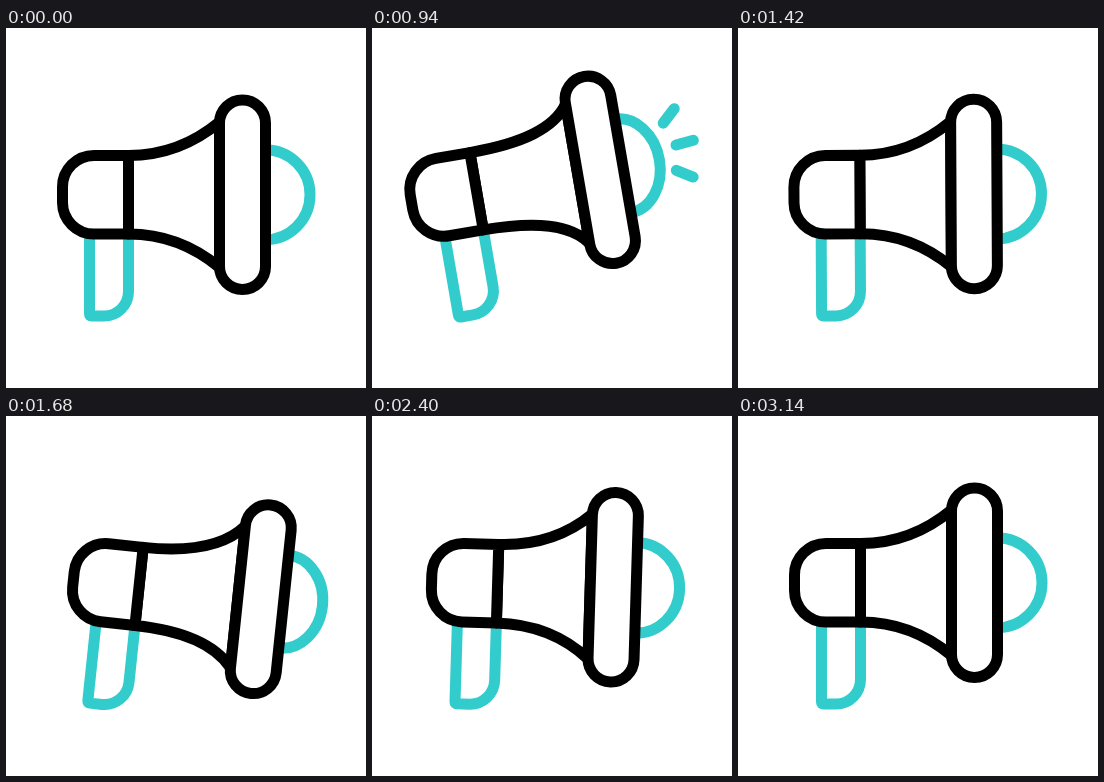
Animation, 360 px wide and 360 px high, one loop 3.16 s. Source, as an HTML page:

```html
<!DOCTYPE html>
<html lang="en">
<head>
<meta charset="utf-8">
<title>Megaphone</title>
<style>
  html, body { margin: 0; height: 100%; overflow: hidden; background: #fff; }
  svg { display: block; width: 100vw; height: 100vh; }
  path, rect, ellipse { fill: #fff; stroke: #000; stroke-width: 11; stroke-linecap: round; stroke-linejoin: round; }
  .accent { stroke: #3cc; }
</style>
</head>
<body>
<svg viewBox="0 0 360 360">
  <g id="megaphone">
    <ellipse id="dome" class="accent" cy="166.8"/>
    <path class="accent" d="M83.5 206V286Q83.5 288 85.5 288H98A24.5 24.5 0 0 0 122.5 263.5V206"/>
    <path id="horn"/>
    <path d="M122.5 127.5H88A31.5 31.5 0 0 0 56.5 159V174.5A31.5 31.5 0 0 0 88 206H122.5Z"/>
    <rect id="bell" x="213.5" y="72" width="46" height="189.5" rx="23"/>
  </g>
  <path id="rays" class="accent"/>
</svg>
<script>
const LOOP = 3160;
const [megaphone, dome, horn, bell, rays] =
  ["megaphone", "dome", "horn", "bell", "rays"].map(id => document.getElementById(id));

// Rotation keys: [start, end, from, to]
const TURNS = [
  [210, 715, 0, -9.8],
  [1133, 1640, -9.8, 6],
  [2130, 2550, 6, 0],
];

// Each shout pushes the bell out and fires three rays from (x, y).
const SHOUTS = [
  { start: 715, x: 304, y: 117, angle: -15.5 },
  { start: 1645, x: 332.3, y: 195, angle: 9.8 },
  { start: 2540, x: 320, y: 167, angle: 0 },
];
const RAYS = [[-6.5, -24.5, 8, -35.5], [0, 0, 18, 0], [-6.5, 24.5, 8, 35.5]];

const mix = (a, b, k) => a + (b - a) * k;
function ease(t, from, to) {
  const u = Math.min(1, Math.max(0, (t - from) / (to - from)));
  return u * u * (3 - 2 * u);
}
function setAttrs(el, attrs) {
  for (const name in attrs) el.setAttribute(name, attrs[name]);
}

function rayPath(age) {
  if (age < 45 || age > 380) return "";
  const head = ease(age, 45, 210), tail = ease(age, 235, 365);
  return RAYS.map(([x1, y1, x2, y2]) => {
    const at = k => `${mix(x1, x2, k)} ${mix(y1, y2, k)}`;
    return `M${at(tail)}L${at(head)}`;
  }).join("");
}

function draw(t) {
  const angle = TURNS.reduce((sum, [a, b, from, to]) => sum + (to - from) * ease(t, a, b), 0);
  const push = SHOUTS.reduce((sum, { start }) =>
    sum + ease(t, start - 240, start + 180) - ease(t, start + 360, start + 600), 0);
  const slide = 11.5 * push;

  setAttrs(megaphone, { transform: `rotate(${angle} 93 269.5)` });
  setAttrs(bell, { transform: `translate(${slide})` });
  setAttrs(dome, { cx: 259 + slide, rx: 45 - 7.5 * push, ry: 45 + 2.5 * push });

  const c1 = 158 + 18 * push, c2 = 187 + 23 * push, end = 213.5 + slide;
  const dip = 116 + 2 * push, rim = 94 + 2 * push;
  setAttrs(horn, {
    d: `M122.5 127.5C${c1} 127.5 ${c2} ${dip} ${end} ${rim}` +
       `V${333.5 - rim}C${c2} ${333.5 - dip} ${c1} 206 122.5 206Z`
  });

  const shout = SHOUTS.findLast(s => t >= s.start) || SHOUTS[0];
  setAttrs(rays, {
    transform: `translate(${shout.x} ${shout.y}) rotate(${shout.angle})`,
    d: rayPath(t - shout.start)
  });
}

const origin = performance.now();
function tick() {
  draw((performance.now() - origin) % LOOP);
  requestAnimationFrame(tick);
}
tick();
</script>
</body>
</html>
```
